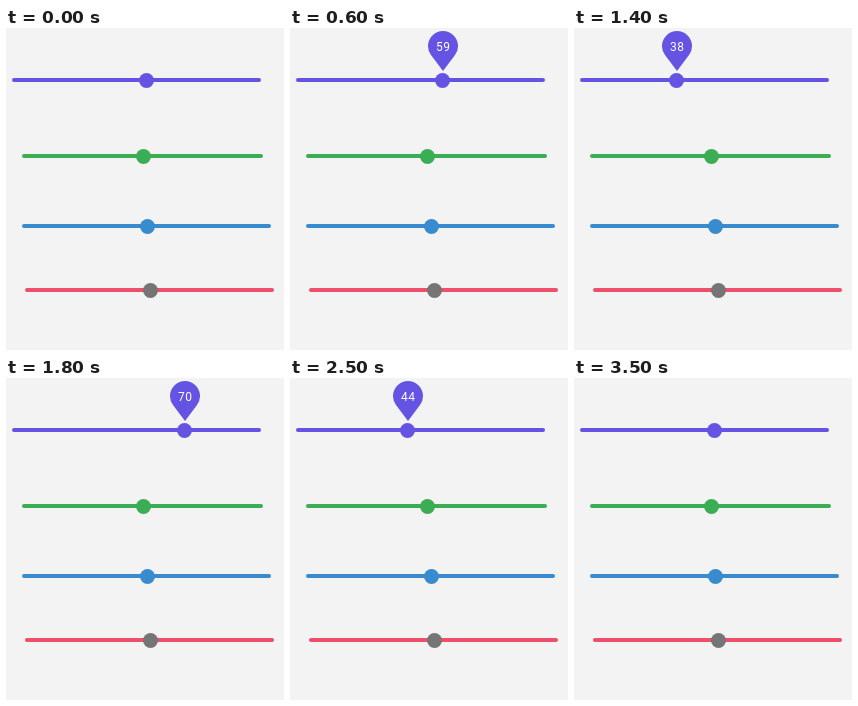
An HTML page for the animation above (4.4 s loop, 278x322 px).

```html
<!DOCTYPE html>
<html lang="en">
<head>
<meta charset="utf-8">
<title>Range sliders</title>
<style>
  html, body { margin: 0; width: 100%; height: 100%; overflow: hidden; background: #f3f3f3; }
  svg { display: block; width: 278px; height: 322px; }
  line { stroke-width: 4; stroke-linecap: round; }
  text { font: 12px Roboto, sans-serif; letter-spacing: .5px; fill: #fff; text-anchor: middle; }
</style>
</head>
<body>
<svg viewBox="0 0 278 322">
  <line x1="8" x2="253" y1="52" y2="52" stroke="#6554e3"/>
  <circle id="thumb" cy="52.5" r="7.5" fill="#6554e3"/>
  <line x1="18" x2="255" y1="128" y2="128" stroke="#3bad55"/>
  <circle cx="137.5" cy="128.5" r="7.5" fill="#3bad55"/>
  <line x1="18" x2="263" y1="198" y2="198" stroke="#388bce"/>
  <circle cx="141.5" cy="198.5" r="7.5" fill="#388bce"/>
  <line x1="21" x2="266" y1="262" y2="262" stroke="#ee4f6b"/>
  <circle cx="144.5" cy="262.5" r="7.5" fill="#757575"/>
  <!-- The pin's tip is its local origin, so it scales from there. -->
  <g id="pin">
    <path d="M0 0L-12 -16A15 15 0 1 1 12 -16Z" fill="#6554e3"/>
    <text id="label" x=".25" y="-20"></text>
  </g>
</svg>
<script>
  const LOOP = 4400, STEP = 100;
  const REST_X = 140.5;
  const TRACK_START = 13.5, PX_PER_UNIT = 2.34;
  const thumb = document.getElementById('thumb');
  const pin = document.getElementById('pin');
  const label = document.getElementById('label');

  const linear = p => p;
  const smooth = p => (1 - Math.cos(Math.PI * p)) / 2;
  const progress = (t, start, end) => Math.min(1, Math.max(0, (t - start) / (end - start)));

  // The thumb is dragged to each x in turn and waits there for the next drag.
  const drags = [
    { start: 100, end: 300, x: 180, ease: smooth },
    { start: 300, end: 1120, x: 87.5, ease: smooth },
    { start: 1321, end: 1839, x: 186, ease: linear },
    { start: 1900, end: 2000, x: 191, ease: linear },
    { start: 2200, end: 2695, x: 80.5, ease: smooth },
    { start: 2900, end: 3120, x: REST_X, ease: smooth }
  ];

  function thumbX(t) {
    const x = drags.reduce((from, { start, end, x, ease }) =>
      from + (x - from) * ease(progress(t, start, end)), REST_X);
    return Math.round(x - .5) + .5;
  }

  const pinScale = t => smooth(progress(t, 100, 400)) - smooth(progress(t, 3200, 3500));

  function draw(now) {
    const t = Math.floor(now % LOOP / STEP) * STEP;
    const x = thumbX(t);
    thumb.setAttribute('cx', x);
    pin.setAttribute('transform', `translate(${x + .5} 43) scale(${pinScale(t)})`);
    label.textContent = Math.floor((x - TRACK_START) / PX_PER_UNIT);
  }

  const start = performance.now();
  function tick() {
    draw(performance.now() - start);
    requestAnimationFrame(tick);
  }
  tick();
</script>
</body>
</html>
```
